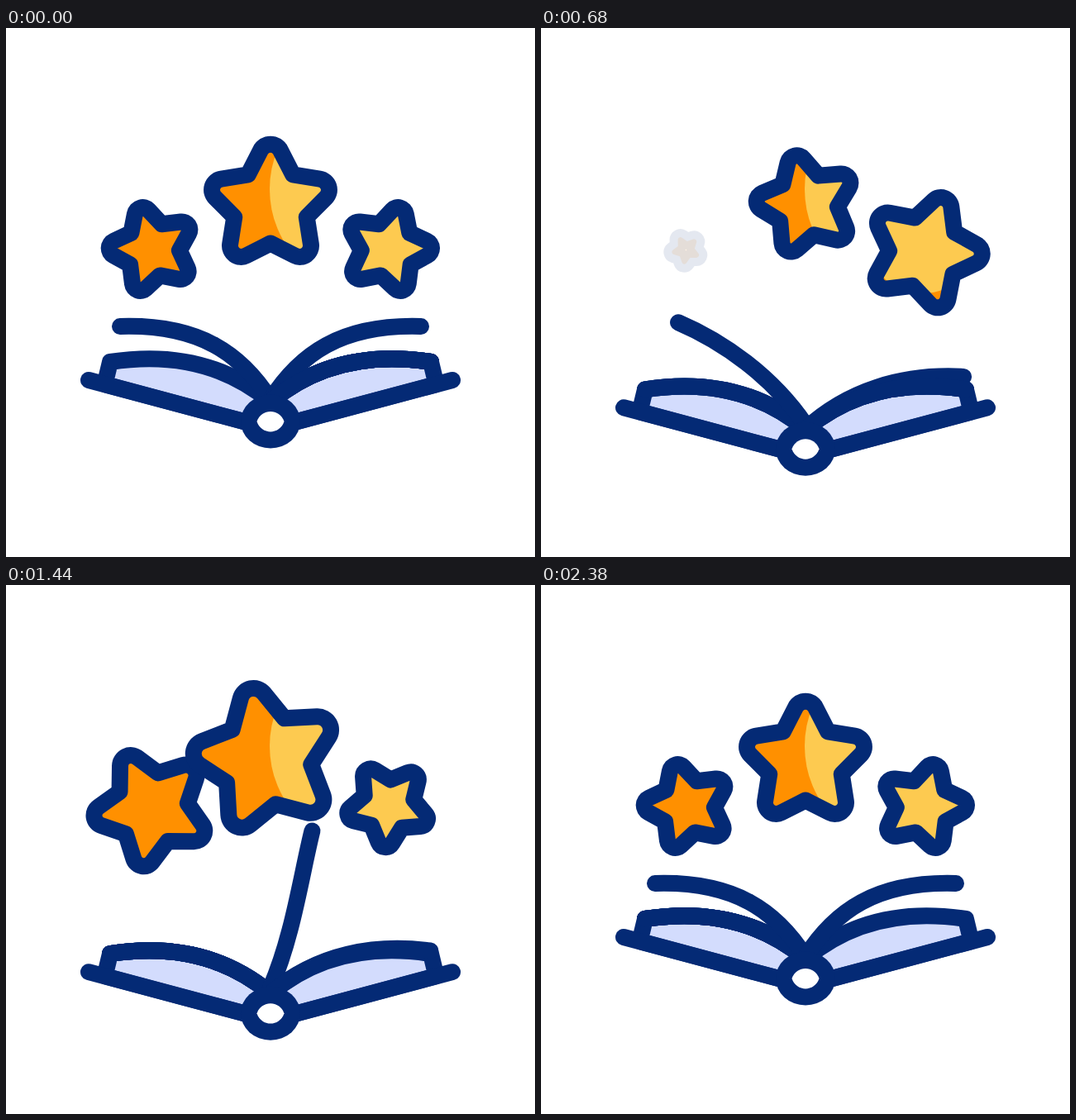
Write an HTML page that moves like this. It is 640 by 640 pixels and loops after 2.4 s.

```html
<!DOCTYPE html>
<html lang="en">
<head>
<meta charset="utf-8">
<title>Book and stars</title>
<style>
  html, body { margin: 0; width: 100%; height: 100%; overflow: hidden; background: #fff; }
  svg { display: block; width: 100vw; height: 100vh; }
  .line { fill: none; stroke: #042a75; stroke-width: 20; stroke-linecap: round; stroke-linejoin: round; }
</style>
</head>
<body>
<svg viewBox="0 0 640 640">
  <defs>
    <g id="half">
      <path class="line" style="fill:#d3dcfd" d="M119.5 431L126 404C190 394 260 402 320 452L320 476L297 478.5Z"/>
      <path class="line" d="M100 426L297 478.5"/>
    </g>
  </defs>
  <g id="book">
    <use href="#half"/>
    <use href="#half" transform="translate(640) scale(-1 1)"/>
    <g id="pages"></g>
    <ellipse fill="#042a75" cx="320" cy="476" rx="36" ry="32.5"/>
    <path fill="#fff" d="M303.5 476C309 460 331 460 336.5 476C331 492.5 309 492.5 303.5 476Z"/>
  </g>
  <g id="stars"></g>
</svg>
<script>
const LOOP = 2400, PI = Math.PI;
const $ = id => document.getElementById(id);
const lerp = (a, b, f) => a + (b - a) * f;
const clamp = v => Math.max(0, Math.min(1, v));
const smooth = x => x * x * (3 - 2 * x);

function add(parent, tag, attrs = {}) {
  const el = document.createElementNS('http://www.w3.org/2000/svg', tag);
  for (const k in attrs) el.setAttribute(k, attrs[k]);
  return parent.appendChild(el);
}

// Eased value through a list of times and a list of values
function track(t, times, values) {
  if (t <= times[0]) return values[0];
  const i = times.findIndex(k => k > t);
  if (i < 0) return values[values.length - 1];
  return lerp(values[i - 1], values[i], smooth((t - times[i - 1]) / (times[i] - times[i - 1])));
}

// Steep ease in and out: cubic-bezier(.75, 0, .25, 1)
function steep(x) {
  let lo = 0, hi = 1, s;
  for (let i = 0; i < 22; i++) {
    s = (lo + hi) / 2;
    const bx = 2.25 * (1 - s) ** 2 * s + 0.75 * (1 - s) * s * s + s ** 3;
    if (bx < x) lo = s; else hi = s;
  }
  return smooth(s);
}

const bookDrop = t => 44 * (t < 1170 ? steep(t / 1170) : 1 - steep(clamp((t - 1170) / 1200)));

// Page shapes while turning from the right to upright:
// angle, then tip and two control points, x measured from the spine
const poses = [
  [0, 194, 404, 130, 394, 60, 402, 452],
  [.176, 191, 388, 116, 384, 50, 406, 452],
  [.288, 186, 377, 110, 378, 44, 405, 451],
  [.353, 182, 361, 85, 358, 35, 395, 450],
  [.654, 154, 323, 100, 346, 40, 388, 447],
  [.808, 134, 302, 85, 338, 35, 388, 447],
  [1.31, 50, 255, 37, 308, 27, 383, 445],
  [PI / 2, 0, 249, 0, 310, 0, 375, 445]
];

function pagePath(angle) {
  const side = angle > PI / 2 ? -1 : 1;
  const a = side < 0 ? PI - angle : angle;
  let i = 1;
  while (i < poses.length - 1 && poses[i][0] < a) i++;
  const p = poses[i - 1], q = poses[i], f = clamp((a - p[0]) / (q[0] - p[0]));
  const [, x0, y0, x1, y1, x2, y2, yEnd] = p.map((v, n) => lerp(v, q[n], f));
  const X = x => 320 + side * x;
  return `M${X(x0)} ${y0}C${X(x1)} ${y1} ${X(x2)} ${y2} 320 ${yEnd}`;
}

// start, end, first angle, last angle
const REST = .353;
const pages = [
  [0, 300, PI - REST, PI],
  [0, 480, REST, PI],
  [334, 824, 0, PI],
  [611, 1101, 0, PI],
  [849, 1339, 0, PI],
  [1210, 1690, 0, PI - REST],
  [1340, 1810, 0, REST]
].map(([start, end, from, to]) => ({
  times: [start, end], angles: [from, to], el: add($('pages'), 'path', { class: 'line' })
}));

// Five-pointed star with rounded tips and sharp notches
function starPath(cx, cy, size, degrees) {
  const at = (radius, step) => {
    const a = (degrees - 90 + step * 36) * PI / 180;
    return [cx + radius * size * Math.cos(a), cy + radius * size * Math.sin(a)];
  };
  const mix = (p, q) => `${lerp(p[0], q[0], .445)} ${lerp(p[1], q[1], .445)}`;
  const r = 13.5 * size;
  let d = '';
  for (let i = 0; i < 10; i += 2) {
    const before = at(46, i - 1), tip = at(90, i), after = at(46, i + 1);
    d += `${i ? 'L' : 'M'}${before.join(' ')}L${mix(tip, before)}A${r} ${r} 0 0 1 ${mix(tip, after)}`;
  }
  return d + 'Z';
}

// x, y: pivot; dx, dy: star centre from the pivot; light: yellow circle
const stars = [
  { x: 175, y: 268, dx: 2.2, dy: 0, size: .711, tilt: -16, peak: 1.36, delay: 0, light: [0, 0, 0] },
  { x: 320.75, y: 209, dx: -.75, dy: 5.53, size: 1, tilt: 0, peak: 1.24, delay: 98, light: [444, 195, 125] },
  { x: 465.2, y: 267.6, dx: -2.7, dy: .4, size: .711, tilt: 16, peak: 1.36, delay: 196, light: [462, 252, 69] }
];
stars.forEach((s, i) => {
  const [cx, cy, r] = s.light;
  const clip = add($('stars'), 'clipPath', { id: 'clip' + i });
  const body = add($('stars'), 'g');
  const fill = add(body, 'path', { fill: '#ff9000' });
  add(body, 'circle', { cx, cy, r, fill: '#fdca50', 'clip-path': `url(#clip${i})` });
  const outline = add($('stars'), 'path', { class: 'line' });
  s.paths = [add(clip, 'path'), fill, outline];
  s.layers = [body, outline];
});

const starTimes = [50, 450, 788, 985, 1389, 1765];

function drawStar(s, time) {
  const t = time - s.delay;
  const scale = track(t, starTimes, [1, s.peak, 0, 0, s.peak, 1]);
  const turn = track(t, starTimes, [0, -73, 102, -72, 65, 0]);
  const c = Math.cos(turn * PI / 180) * scale, n = Math.sin(turn * PI / 180) * scale;
  const d = starPath(s.x + s.dx * c - s.dy * n, s.y + s.dx * n + s.dy * c, s.size * scale, s.tilt + turn);
  s.paths.forEach(p => p.setAttribute('d', d));
  s.layers.forEach(l => l.setAttribute('opacity', clamp((scale - .28) / .45)));
}

function draw(now) {
  const t = now % LOOP;
  $('book').setAttribute('transform', `translate(0 ${bookDrop(t)})`);
  pages.forEach(p => p.el.setAttribute('d', pagePath(track(t, p.times, p.angles))));
  stars.forEach(s => drawStar(s, t));
}

let begin;
function tick(now) {
  begin ??= now;
  draw(now - begin);
  requestAnimationFrame(tick);
}
draw(0);
requestAnimationFrame(tick);
</script>
</body>
</html>
```
